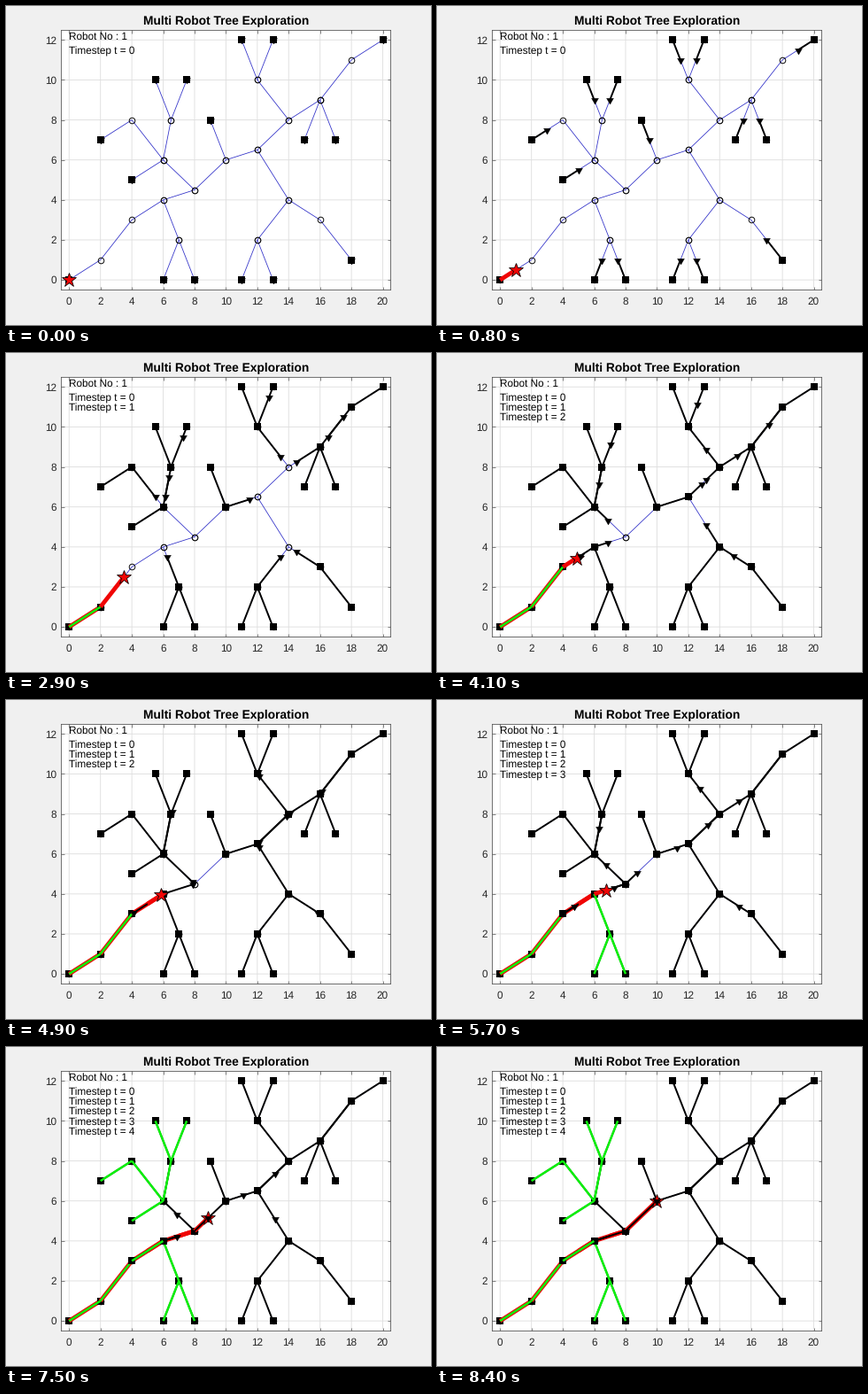
Animation, 480 px wide and 360 px high, one loop 8.5 s. Source, as a matplotlib script:

```python
import numpy as np
import matplotlib.pyplot as plt
from matplotlib.animation import FuncAnimation

W, H = 480, 360
SUB = 17                     # frames per timestep
INK, FRAME = "#262626", "#505050"
RED, GREEN, BLUE = "#f00505", "#0cf20c", "#3030c8"

plt.rcParams["font.family"] = ["Liberation Sans", "DejaVu Sans"]
plt.rcParams["text.hinting"] = "none"

NODES = {
    "R": (0, 0), "A": (2, 1), "B": (4, 3), "C": (6, 4), "D": (7, 2),
    "E": (6, 0), "F": (8, 0), "G": (8, 4.5), "H": (6, 6), "I": (4, 5),
    "J": (4, 8), "K": (2, 7), "L": (6.5, 8), "M": (5.5, 10), "N": (7.5, 10),
    "O": (10, 6), "P": (9, 8), "Q": (12, 6.5), "S": (14, 8), "T": (12, 10),
    "U": (11, 12), "V": (13, 12), "W": (16, 9), "X": (15, 7), "Y": (17, 7),
    "Z": (18, 11), "g": (20, 12), "a": (14, 4), "b": (12, 2), "c": (11, 0),
    "d": (13, 0), "e": (16, 3), "f": (18, 1),
}
NODES = {k: np.array(v, float) for k, v in NODES.items()}
EDGES = ("RA AB BC CD DE DF CG GH HI HJ JK HL LM LN GO OP OQ QS ST TU TV "
         "SW WX WY WZ Zg Qa ab bc bd ae ef").split()

# helper robots: one "from-to" pair per move and timestep
MOVES = [m.split() for m in (
    "ED FD cb db fe KJ IH ML NL PO UT VT XW YW gZ",
    "JH LH HL LN TV TS WS ZW WZ OQ DC ba ea",
    "HG LH NL VT ST SQ QS WS ZW aQ ae CG CB",
    "HG LH TS WS SQ QO GO GC BC ea",
    "SQ aQ QO GO HG CG",
)]
LEADER = ["RA", "AB", "BC", "CG", "GO"]
DONE = [d.split() for d in ("", "RA", "AB", "CD DE DF", "BC HI HJ JK HL LM LN")]
STEPS = len(MOVES)

fig = plt.figure(figsize=(W / 72, H / 72), dpi=72, facecolor="#f0f0f0")
ax = fig.add_axes([0.13, 0.11, 0.775, 0.815])
ax.set(xlim=(-0.5, 20.5), ylim=(-0.5, 12.5),
       xticks=range(0, 21, 2), yticks=range(0, 13, 2))
ax.set_axisbelow(True)
ax.grid(color="#dfdfdf", lw=0.9, snap=False)
ax.tick_params(direction="in", length=3.5, width=0.7, color=FRAME, top=True,
               right=True, labelbottom=False, labelleft=False)
for side in ax.spines.values():
    side.set(linewidth=0.8, color=FRAME)


def label(x, y, text, size=11.75, **kw):
    """Text with its baseline at stage pixel (x, y)."""
    return fig.text(x / W, 1 - y / H, text, fontsize=size, va="baseline", **kw)


def line(pair, color, width, z):
    p, q = NODES[pair[0]], NODES[pair[1]]
    return ax.plot([p[0], q[0]], [p[1], q[1]], color=color, lw=width,
                   zorder=z, solid_capstyle="butt")[0]


def marks(names, marker, size, z, **kw):
    pts = np.array([NODES[n] for n in names])
    return ax.plot(pts[:, 0], pts[:, 1], ls="", marker=marker,
                   ms=size, zorder=z, **kw)[0]


def along(pair, t):
    p, q = NODES[pair[0]], NODES[pair[1]]
    return p + (q - p) * t


label(248.4, 21, "Multi Robot Tree Exploration", 13.7, weight="bold",
      ha="center", color="black")
for v in range(0, 21, 2):
    label(71.1 + 17.714 * v, 337.3, str(v), ha="center", color=INK)
for v in range(0, 13, 2):
    label(57.2, 313 - 22.54 * v, str(v), ha="right", color=INK)
label(71.2, 38.2, "Robot No : 1", color="black")
stamps = [label(71.2, 54.2 + 11.4 * s, f"Timestep t = {s}", color="black")
          for s in range(STEPS)]

# circles repeat at shared nodes, so busy nodes look bolder
for e in EDGES:
    line(e, BLUE, 0.8, 2)
    marks(e, "o", 6.6, 2.5, mfc="none", mec=(0, 0, 0, 0.7), mew=0.85)

trails = []                  # (step, pair, start fraction, line)
fixed = []                   # (step, artist) shown from that step on
black = set()                # edges already black from end to end
for s in range(STEPS):
    z = 3 + s
    lead = LEADER[s]
    starts = sorted({m[0] for m in MOVES[s] + [lead]})
    fixed.append((s, marks(starts, "s", 7.4, z, color="black", mew=0)))
    fixed += [(s, line(e, GREEN, 2.5, z + 0.1)) for e in DONE[s]]
    trails.append((s, lead, 0, line(lead, RED, 4.8, z + 0.2)))
    for m in MOVES[s]:
        if m not in black or m in LEADER or m[::-1] in LEADER:
            trails.append((s, m, 0, line(m, "black", 1.95, z + 0.3)))
    black |= {e for m in MOVES[s] for e in (m, m[::-1])}
    if lead[::-1] in MOVES[s]:
        # after meeting halfway the leader paints over the other trail
        trails.append((s, lead, 0.5, line(lead, RED, 4.8, z + 0.4)))

star = ax.plot([], [], ls="", marker="*", ms=16.4, mfc=RED, mec="black",
               mew=0.75, zorder=20)[0]
tris = ax.plot([], [], ls="", marker=(3, 0, 180), ms=9, color="black",
               mew=0.4, zorder=21)[0]


def draw(frame):
    step, k = divmod(frame, SUB)
    t = k / (SUB - 1)
    for s, artist in fixed:
        artist.set_visible(s <= step)
    for s, text in enumerate(stamps):
        text.set_visible(s <= step)
    for s, pair, t0, trail in trails:
        end = 1 if s < step else t
        trail.set_visible(s <= step and end > t0)
        trail.set_data(*zip(along(pair, t0), along(pair, end)))
    star.set_data(*along(LEADER[step], t)[:, None])
    tris.set_data(*np.array([along(m, t) for m in MOVES[step]]).T)
    return []


anim = FuncAnimation(fig, draw, frames=STEPS * SUB, interval=100,
                     init_func=lambda: draw(0), repeat=True, repeat_delay=0,
                     blit=False)
plt.show()
```
